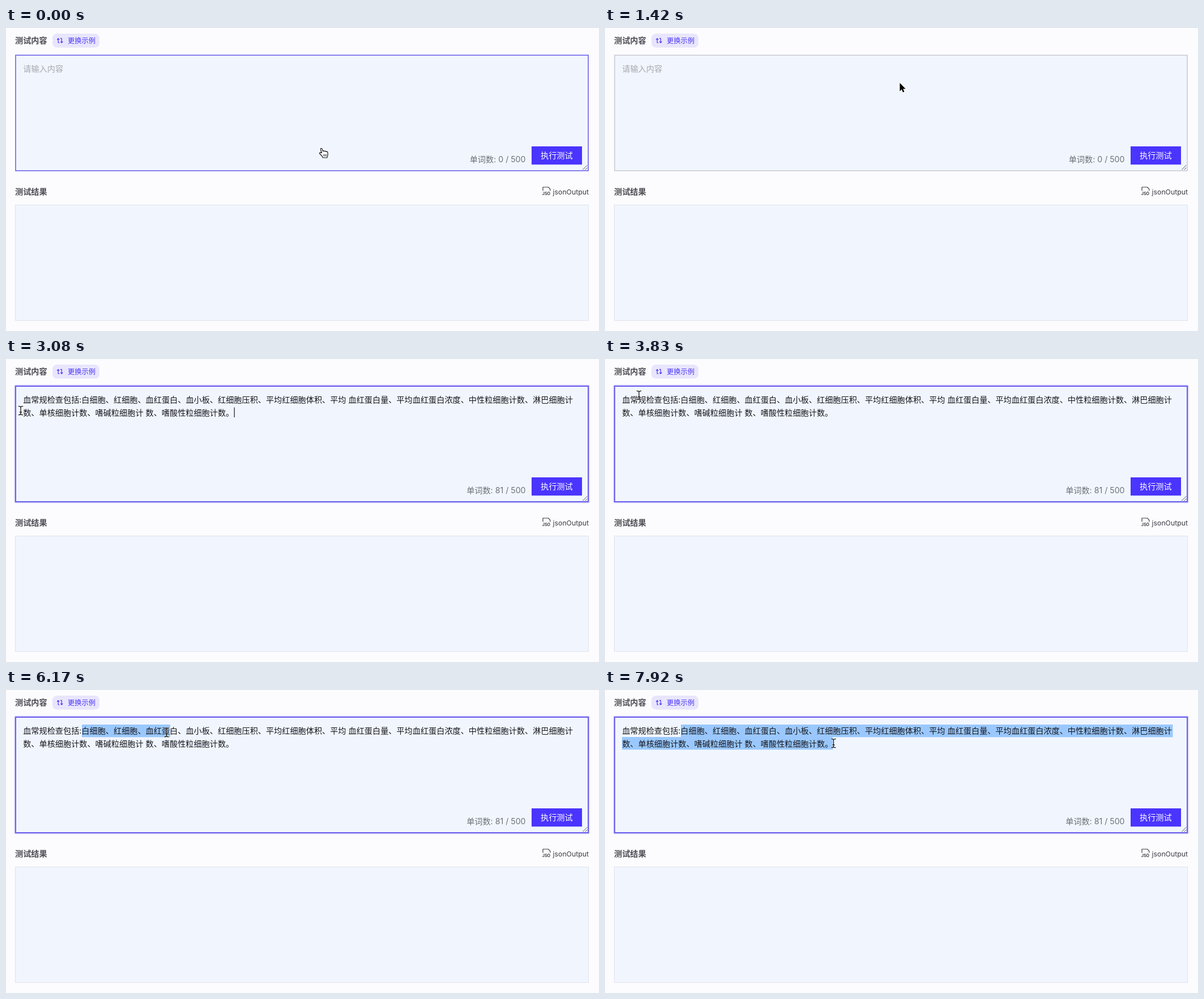
Write an HTML page that moves like this. It is 1047x535 px and loops after 8 s.

```html
<!DOCTYPE html>
<html lang="zh-CN">
<head>
<meta charset="utf-8">
<title>测试内容</title>
<style>
  html, body { margin: 0; width: 100%; height: 100%; overflow: hidden; background: #fcfcff; }
  svg { display: block; width: 100%; height: 100%; }
  text { font: 14.17px Inter, "Noto Sans CJK SC", "Noto Sans CJK", sans-serif; white-space: pre; }
  .heading { font-weight: 700; fill: #4b4b52; }
  .small { font-size: 12.25px; }
  .end { text-anchor: end; }
  .panel { fill: #f1f6fe; }
  .line { fill: none; stroke-linecap: round; stroke-linejoin: round; }
  #selection rect { fill: #9ac8fe; }
</style>
</head>
<body>
<svg viewBox="0 0 1047 535">
  <text class="heading" x="16" y="27.3">测试内容</text>
  <rect x="82" y="10" width="83" height="24.5" rx="8" fill="#e8e5fd"/>
  <g class="line" stroke="#4a36f5" stroke-width="1.2">
    <path d="M94 26H92.2V18.6M90.5 20.3L92.2 18.4L93.9 20.3"/>
    <path d="M96.5 18.4H98.3V25.8M96.6 24.1L98.3 26L100 24.1"/>
  </g>
  <text class="small" x="109" y="27" fill="#4a36f5">更换示例</text>

  <rect id="glow" x="16" y="47" width="1013" height="206" rx="1" fill="none" stroke="#8f86fa" stroke-width="3" stroke-opacity=".4"/>
  <rect id="box" class="panel" x="17" y="48" width="1011" height="204" stroke-width="2"/>
  <g id="selection">
    <rect y="61" height="22.3"/>
    <rect y="83" height="22.3"/>
  </g>
  <text id="placeholder" x="30.3" y="77" fill="#a5a7ad">请输入内容</text>
  <g id="content" fill="#17171c">
    <text x="30.2" y="77">血常规检查包括:白细胞、红细胞、血红蛋白、血小板、红细胞压积、平均红细胞体积、平均 血红蛋白量、平均血红蛋白浓度、中性粒细胞计数、淋巴细胞计</text>
    <text x="30.2" y="99.5">数、单核细胞计数、嗜碱粒细胞计 数、嗜酸性粒细胞计数。</text>
  </g>
  <rect id="caret" width="1.2" height="17.5" fill="#17171c"/>
  <text id="count" class="end" x="917.5" y="237.2" fill="#6d7077"></text>
  <rect x="928" y="210.5" width="89" height="32" fill="#4a34ff" opacity=".12"/>
  <rect x="928" y="209" width="89" height="32" fill="#4a34ff"/>
  <text x="944" y="230.3" fill="#fff">执行测试</text>
  <path class="line" d="M1018.5 250L1026 242.5M1023 250L1026 247" stroke="#56575c"/>

  <text class="heading" x="16" y="294.3">测试结果</text>
  <path class="line" d="M948 287V281H957.5L960.8 284.3V287" stroke="#3c3c43" stroke-width="1.2"/>
  <text x="946.8" y="294.6" fill="#3c3c43" style="font-size:7px;font-weight:700">JSO</text>
  <text class="small end" x="1029" y="293.6" fill="#3c3c43">jsonOutput</text>
  <rect class="panel" x="16.5" y="312.5" width="1012" height="204" stroke="#dfe1ee"/>

  <g id="pointer">
    <g id="hand" stroke="#111" stroke-width="1.2" stroke-linejoin="round">
      <path fill="#fff" d="M4.5 9L2.5 3.2C1.8.8 4.4 0 5.2 2.2L6.8 6.2C7.5 5 9.3 5.2 9.6 6.4C10.5 5.4 12 5.8 12.3 7C13.4 6.2 15 7 15 8.5L15.2 12C15.2 14 14 15 13.8 17.5H6.5C6 15.5 3 12.5 1 10.5C-.2 9.2 1.8 7.6 3 8.6Z" transform="translate(-8 -9.5)"/>
      <path d="M0 2V5.5M2.1 2V5.5M4.2 2V5.5" stroke-width=".9"/>
    </g>
    <path id="arrow" d="M0 0V14.5L3.3 11.4L5.6 16.6L8 15.5L5.7 10.5H10.2Z" fill="#000" stroke="#fff" stroke-width="1.1" paint-order="stroke"/>
    <g id="beam" class="line">
      <path d="M-3.7 -7.6Q0 -7.6 0 -5.4Q0 -7.6 3.7 -7.6M0 -5.4V5.4M-3.7 7.6Q0 7.6 0 5.4Q0 7.6 3.7 7.6M-1.8 2.8H1.8" stroke="#fff" stroke-width="2.8" opacity=".7"/>
      <path d="M-3.7 -7.6Q0 -7.6 0 -5.4Q0 -7.6 3.7 -7.6M0 -5.4V5.4M-3.7 7.6Q0 7.6 0 5.4Q0 7.6 3.7 7.6M-1.8 2.8H1.8" stroke="#111" stroke-width="1.3"/>
    </g>
  </g>
</svg>
<script>
const LOOP = 8000, FPS = 12;
const EM = 14.17, LEFT = 30, SELECT_FROM = 134, LINE_END = 1002.5;
const HOVER = [136, 128, 238], IDLE = [211, 212, 222], FOCUS = [106, 95, 234];

// Pointer path: tick, x, y
const PATH = [
  [8, 561, 221], [11, 520.5, 88], [12, 520.5, 88], [14, 520.5, 97], [30, 520.5, 97],
  [33, 112.5, 128], [35, 112.5, 126], [37, 26, 91], [38, 26, 91], [46, 60, 64],
  [48, 52.5, 62], [51, 142, 61], [52, 142, 61], [55, 134.5, 70], [59, 134.5, 70],
  [60, 136.5, 70], [65, 200.5, 73], [68, 200.5, 73], [71, 237, 63], [74, 283.5, 75],
  [76, 283.5, 75], [83, 347, 75], [86, 347, 75], [95, 403.5, 94]
];

const $ = id => document.getElementById(id);
const show = (id, on) => $(id).style.display = on ? '' : 'none';
const clamp = v => Math.min(1, Math.max(0, v));
const ramp = (tick, from, to) => clamp((tick - from) / (to - from));
const within = (tick, from, to) => tick >= from && tick < to;
const mix = (a, b, p) => a.map((v, i) => v + (b[i] - v) * p);
const [lineOne, lineTwo] = $('selection').children;

function pointerAt(tick) {
  const next = PATH.findIndex(key => key[0] >= tick);
  if (next <= 0) return PATH[0].slice(1);
  const a = PATH[next - 1], b = PATH[next];
  return mix(a, b, ramp(tick, a[0], b[0])).slice(1);
}

function setSpan(rect, from, to) {
  rect.setAttribute('x', from);
  rect.setAttribute('width', Math.max(0, to - from));
}

function select(tick, x, y) {
  const dragging = tick >= 60, second = dragging && y > 83;
  const snap = start => start + Math.round((x - start) / EM) * EM;
  setSpan(lineOne, SELECT_FROM, second ? LINE_END : dragging ? snap(SELECT_FROM) : 0);
  setSpan(lineTwo, LEFT, second ? snap(LEFT + 4) : 0);
}

function draw(tick) {
  const [x, y] = pointerAt(tick);
  const focus = ramp(tick, 17, 20), filled = tick >= 24;
  const border = mix(mix(HOVER, IDLE, ramp(tick, 8, 11)), FOCUS, focus);
  $('box').setAttribute('stroke', `rgb(${border.map(Math.round)})`);
  $('glow').style.opacity = focus;

  show('placeholder', !filled);
  show('content', filled);
  $('count').textContent = `单词数: ${filled ? 81 : 0} / 500`;

  show('caret', within(tick, 20, 24) || [25, 37, 49].some(start => within(tick, start, start + 6)));
  $('caret').setAttribute('x', filled ? 402.6 : LEFT);
  $('caret').setAttribute('y', filled ? 85.5 : 63);
  select(tick, x, y);

  const kind = tick < 9 ? 'hand' : within(tick, 17, 19) ? 'arrow' : 'beam';
  for (const name of ['hand', 'arrow', 'beam']) show(name, name === kind);
  $('pointer').setAttribute('transform', `translate(${x} ${y})`);
}

const begin = performance.now();
function frame() {
  const time = (performance.now() - begin) % LOOP;
  draw(Math.min(95, Math.floor((time + 4) * FPS / 1000)));
  requestAnimationFrame(frame);
}
frame();
</script>
</body>
</html>
```
